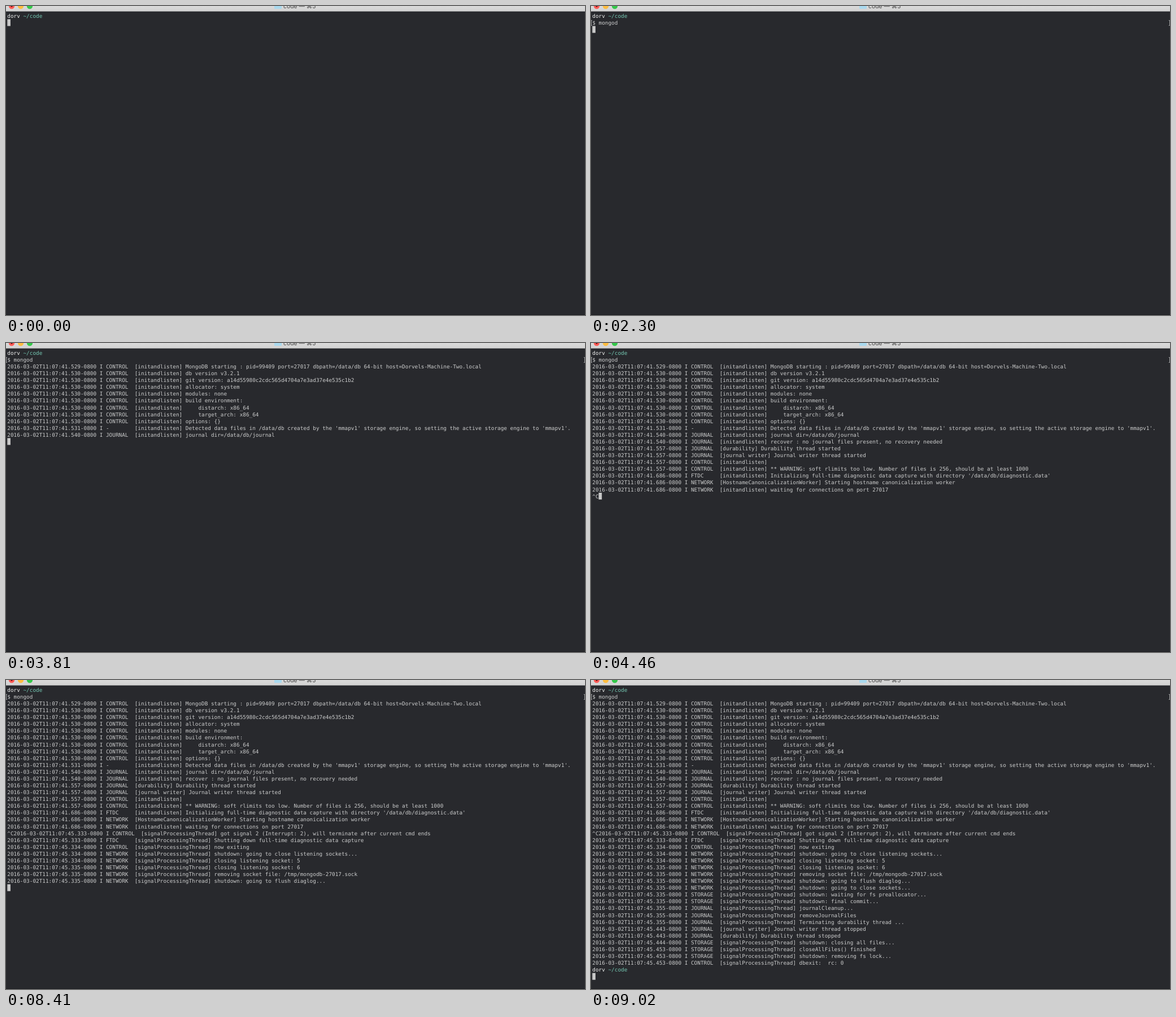
Write an HTML page that moves like this. It is 1025 by 547 pixels and loops after 9120 ms.

```html
<!DOCTYPE html>
<html lang="en">
<head>
<meta charset="utf-8">
<title>Terminal</title>
<style>
  html, body { margin: 0; width: 100%; height: 100%; overflow: hidden; background: #28292d; }
  svg { display: block; }
  text { text-rendering: geometricPrecision; }
  #rows text { font: 9.363px "DejaVu Sans Mono", monospace; fill: #cbcccc; white-space: pre; }
  #rows .user { fill: #f1f2f1; }
  #rows .path { fill: #74c7b2; }
  .title { font: 10.4px Inter, "DejaVu Sans", sans-serif; fill: #454545; }
</style>
</head>
<body>
<svg id="stage" width="1025" height="547" viewBox="0 0 1025 547">
  <defs>
    <linearGradient id="bar" x2="0" y2="1">
      <stop offset="0" stop-color="#dadada"/>
      <stop offset="1" stop-color="#d2d2d2"/>
    </linearGradient>
  </defs>
  <rect width="1025" height="547" fill="#28292d"/>
  <rect width="1025" height="9" fill="url(#bar)"/>
  <rect y="9" width="1025" height="1" fill="#8b8b8c"/>
  <rect y="546" width="1025" height="1" fill="#1c1d20"/>
  <circle cx="10" cy="0" r="5.2" fill="#fc5b57"/>
  <circle cx="10" cy="0" r="1.8" fill="#5c0a08"/>
  <circle cx="26" cy="0" r="5.2" fill="#fdbd40"/>
  <circle cx="42" cy="0" r="5.2" fill="#34c84a"/>
  <rect x="475" y="-4" width="13" height="9" rx="0.8" fill="#a9d9ee"/>
  <text class="title" x="491" y="4.3">code — ⌘5</text>
  <g id="marks" fill="none" stroke="#a2a3a4">
    <path d="M2.2 25.5H0.5V34.5H2.2"/>
    <path d="M1022.8 25.5H1024.5V34.5H1022.8"/>
  </g>
  <g id="rows"></g>
  <rect id="cursor" width="5.64" height="12.08" fill="#c8c8c8"/>
</svg>
<script>
const LOOP = 9120;
const LEFT = 2.3, PITCH = 5.637, LINE = 12.08;
const COMMAND = "$ mongod";
const byId = id => document.getElementById(id);

const log = (time, part, thread, msg = "") =>
  `2016-03-02T11:07:${time}-0800 I ${part.padEnd(9)}[${thread}] ${msg}`;
const init = (ms, part, msg) => log("41." + ms, part, "initandlisten", msg);
const stop = (ms, part, msg) => log("45." + ms, part, "signalProcessingThread", msg);
const PROMPT = ["dorv ", "~/code"];

const lines = [
  PROMPT,
  COMMAND,
  init(529, "CONTROL", "MongoDB starting : pid=99409 port=27017 dbpath=/data/db 64-bit host=Dorvels-Machine-Two.local"),
  init(530, "CONTROL", "db version v3.2.1"),
  init(530, "CONTROL", "git version: a14d55980c2cdc565d4704a7e3ad37e4e535c1b2"),
  init(530, "CONTROL", "allocator: system"),
  init(530, "CONTROL", "modules: none"),
  init(530, "CONTROL", "build environment:"),
  init(530, "CONTROL", "    distarch: x86_64"),
  init(530, "CONTROL", "    target_arch: x86_64"),
  init(530, "CONTROL", "options: {}"),
  init(531, "-", "Detected data files in /data/db created by the 'mmapv1' storage engine, so setting the active storage engine to 'mmapv1'."),
  init(540, "JOURNAL", "journal dir=/data/db/journal"),
  init(540, "JOURNAL", "recover : no journal files present, no recovery needed"),
  log("41.557", "JOURNAL", "durability", "Durability thread started"),
  log("41.557", "JOURNAL", "journal writer", "Journal writer thread started"),
  init(557, "CONTROL"),
  init(557, "CONTROL", "** WARNING: soft rlimits too low. Number of files is 256, should be at least 1000"),
  init(686, "FTDC", "Initializing full-time diagnostic data capture with directory '/data/db/diagnostic.data'"),
  log("41.686", "NETWORK", "HostnameCanonicalizationWorker", "Starting hostname canonicalization worker"),
  init(686, "NETWORK", "waiting for connections on port 27017"),
  "^C" + stop(333, "CONTROL", "got signal 2 (Interrupt: 2), will terminate after current cmd ends"),
  stop(333, "FTDC", "Shutting down full-time diagnostic data capture"),
  stop(334, "CONTROL", "now exiting"),
  stop(334, "NETWORK", "shutdown: going to close listening sockets..."),
  stop(334, "NETWORK", "closing listening socket: 5"),
  stop(335, "NETWORK", "closing listening socket: 6"),
  stop(335, "NETWORK", "removing socket file: /tmp/mongodb-27017.sock"),
  stop(335, "NETWORK", "shutdown: going to flush diaglog..."),
  stop(335, "NETWORK", "shutdown: going to close sockets..."),
  stop(335, "STORAGE", "shutdown: waiting for fs preallocator..."),
  stop(335, "STORAGE", "shutdown: final commit..."),
  stop(355, "JOURNAL", "journalCleanup..."),
  stop(355, "JOURNAL", "removeJournalFiles"),
  stop(355, "JOURNAL", "Terminating durability thread ..."),
  log("45.443", "JOURNAL", "journal writer", "Journal writer thread stopped"),
  log("45.443", "JOURNAL", "durability", "Durability thread stopped"),
  stop(444, "STORAGE", "shutdown: closing all files..."),
  stop(453, "STORAGE", "closeAllFiles() finished"),
  stop(453, "STORAGE", "shutdown: removing fs lock..."),
  stop(453, "CONTROL", "dbexit:  rc: 0"),
  PROMPT
];

// [time, cursor row, characters on the cursor row]
const steps = [
  [0, 1, 0], [120, 1, 2], [220, 1, 3], [910, 1, 4], [1160, 1, 5],
  [1220, 1, 6], [1470, 1, 7], [1650, 1, 8], [2300, 2, 0],
  [3570, 4, 0], [3650, 7, 0], [3730, 10, 0], [3810, 13, 0],
  [3910, 14, 0], [4000, 15, 0], [4090, 16, 0], [4180, 18, 0],
  [4270, 19, 0], [4370, 21, 0], [4460, 21, 2],
  [8110, 22, 0], [8210, 24, 0], [8290, 26, 0], [8370, 29, 0],
  [8460, 31, 0], [8540, 34, 0], [8630, 36, 0], [8720, 37, 0],
  [8820, 39, 0], [8920, 41, 0], [9020, 42, 0]
];

const solid = s => s.replace(/ /g, "\u00a0");

function addText(row, col, str, cls) {
  const el = document.createElementNS("http://www.w3.org/2000/svg", "text");
  el.setAttribute("x", LEFT + col * PITCH);
  el.setAttribute("y", (20.9 + row * LINE).toFixed(2));
  if (cls) el.setAttribute("class", cls);
  el.textContent = solid(str);
  byId("rows").append(el);
  return { el, row, str };
}

const texts = lines.flatMap((line, row) => line === PROMPT
  ? [addText(row, 0, PROMPT[0], "user"), addText(row, PROMPT[0].length, PROMPT[1], "path")]
  : [addText(row, 0, line)]);

let shown = -1;

function show(index) {
  const [, row, chars] = steps[index];
  for (const t of texts) {
    const str = t.row < row ? t.str : t.row === row ? t.str.slice(0, chars) : "";
    t.el.textContent = solid(str);
  }
  byId("marks").style.display = row > 1 || chars ? "" : "none";
  byId("cursor").setAttribute("x", LEFT + chars * PITCH);
  byId("cursor").setAttribute("y", 11.3 + row * LINE);
  shown = index;
}

const start = performance.now();

function tick() {
  const t = (performance.now() - start) % LOOP;
  const index = steps.findLastIndex(s => s[0] <= t);
  if (index !== shown) show(index);
  requestAnimationFrame(tick);
}

show(0);
tick();
</script>
</body>
</html>
```
